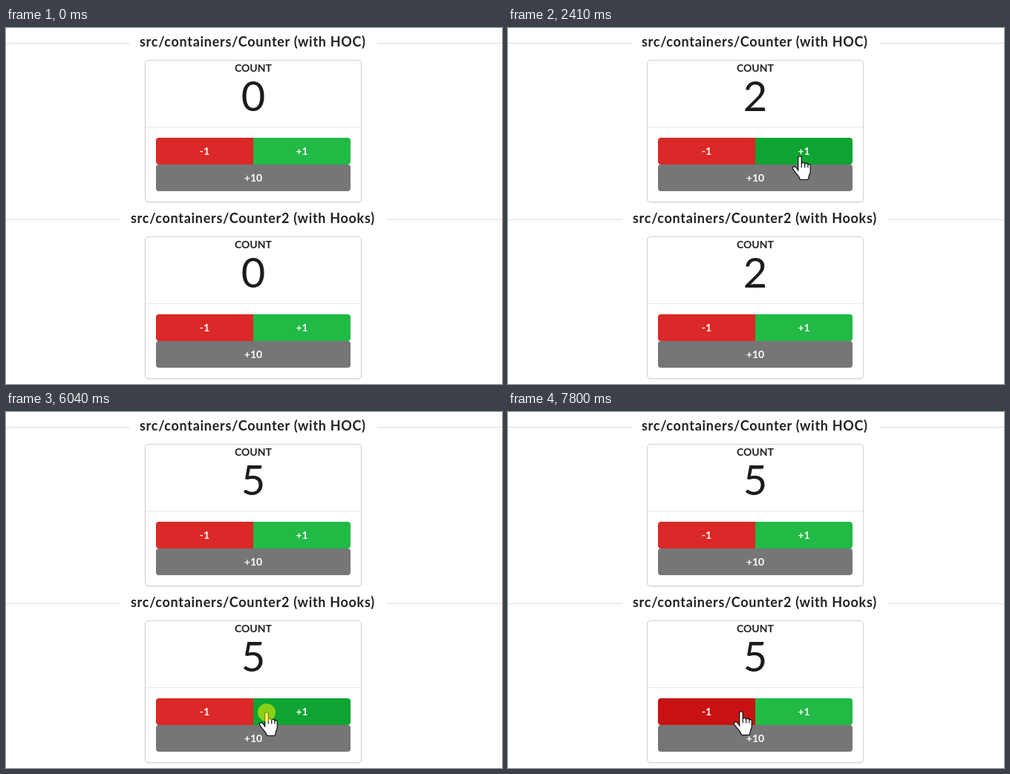
These frames come from a looping animation (668x480 px, 8000 ms). An HTML page:

```html
<!DOCTYPE html>
<html lang="en">
<head>
<meta charset="utf-8">
<title>Counters</title>
<style>
  html, body { margin: 0; width: 100%; height: 100%; overflow: hidden; background: #fff; }
  svg { display: block; width: 668px; height: 480px; font-family: Lato, sans-serif; }
  .title { font-size: 18px; font-weight: 700; letter-spacing: .7px; fill: #212121; }
  .mid { text-anchor: middle; }
  .label { font-size: 14px; font-weight: 700; fill: #212121; }
  .value { font-size: 56px; fill: #1b1c1d; }
  .btn { font-size: 14px; font-weight: 700; fill: #fff; }
  .card { fill: #fff; filter: drop-shadow(0 1px 1.5px #d4d4d5); }
  .edge { fill: none; stroke: #d4d4d5; }
  .cursor { fill: #fff; stroke: #000; stroke-linejoin: round; }
</style>
</head>
<body>
<svg viewBox="0 0 668 480">
  <g id="panels"></g>
  <path id="arrow" class="cursor" d="M.5.5V25.5L6.3 20.2 10.4 29.5 14.4 27.8 10.4 18.5H18.3Z"/>
  <g id="hand" class="cursor">
    <path transform="translate(-10.5 -1) scale(1.5)" stroke-width=".75"
      d="M5.5 14V2a1.5 1.5 0 0 1 3 0V7.5a1.5 1.5 0 0 1 3 .5a1.4 1.4 0 0 1 2.8 .6a1.1 1.1 0 0 1 2.2 .6V14c0 2.5-1.5 3.5-1.5 5.5Q15 21.7 13 21.7H8.5Q6.5 21.7 6.5 19.5C5 17 2 14.5 .8 12C0 10 2.2 9 3.5 10.6L5.5 13M8.5 7.5V11M11.5 8V11M14.3 8.6V11"/>
  </g>
  <circle id="click" r="12" fill="#ff0" fill-opacity=".5"/>
</svg>
<script>
const LOOP = 8000;
const $ = id => document.getElementById(id);

const GREEN = '#21ba45', HOVER = '#16ab39', FOCUS = '#0ea432', PRESSED = '#149b34';
const RED = '#db2828';

// One panel: divider title, card, count and three buttons
const panel = (n, y, title, x, left, right) => `
  <g transform="translate(0 ${y})">
    <path d="M0 20.5H${left}M${right} 20.5H668" stroke="#dedede"/>
    <text class="title" x="${x}" y="25">${title}</text>
    <rect class="card" x="188" y="44" width="290" height="190" rx="4"/>
    <rect class="edge" x="187.5" y="43.5" width="291" height="191" rx="4.5"/>
    <path d="M188 133.5H478" stroke="#000" stroke-opacity=".09"/>
    <text class="mid label" x="333" y="59">COUNT</text>
    <text class="mid value" x="333" y="112" id="count${n}">0</text>
    <path id="minus${n}" d="M333 148H206a4 4 0 0 0-4 4V180a4 4 0 0 0 4 4H333Z" fill="${RED}"/>
    <path id="plus${n}" d="M333 148H460a4 4 0 0 1 4 4V180a4 4 0 0 1-4 4H333Z" fill="${GREEN}"/>
    <rect x="202" y="184" width="262" height="36" rx="4" fill="#767676"/>
    <text class="mid btn" x="267.5" y="171">-1</text>
    <text class="mid btn" x="398.5" y="171">+1</text>
    <text class="mid btn" x="333" y="207">+10</text>
  </g>`;

$('panels').innerHTML =
  panel(1, 0, 'src/containers/Counter (with HOC)', 180, 166, 500) +
  panel(2, 238, 'src/containers/Counter2 (with Hooks)', 168, 154, 512);

// Each track lists [start time, value...]; a value holds until the next entry
const counts = [[0, 0], [1640, 1], [2410, 2], [3180, 3], [4830, 4], [5490, 5], [6140, 6], [7800, 5]];
const clicks = [[0, 0], [2290, 1], [2410, 0], [3060, 1], [3180, 0], [4720, 1], [4830, 0],
  [5370, 1], [5490, 0], [6040, 1], [6140, 0], [7680, 1], [7800, 0]];
const fills = {
  plus1: [[0, GREEN], [1320, '#1db340'], [1430, HOVER], [1640, FOCUS], [4720, GREEN]],
  plus2: [[0, GREEN], [4060, '#1db340'], [4170, HOVER], [4720, FOCUS], [4830, PRESSED],
    [6040, FOCUS], [7680, GREEN]],
  minus2: [[0, RED], [7350, '#d82424'], [7470, '#d01919'], [7680, '#c81111']]
};
const moves = [
  [0, 700, 500, 'arrow'], [100, 568, 466, 'arrow'], [210, 561, 440, 'arrow'],
  [320, 548, 408, 'arrow'], [430, 532, 374, 'arrow'], [540, 514, 342, 'arrow'],
  [650, 497, 314, 'arrow'], [760, 480, 291, 'arrow'], [870, 464, 271, 'arrow'],
  [990, 446, 248, 'arrow'], [1100, 428, 224, 'arrow'], [1210, 411, 200, 'hand'],
  [1320, 398, 180, 'hand'], [1430, 393, 173, 'hand'],
  [3390, 390, 182, 'hand'], [3500, 385, 207, 'hand'], [3610, 377, 245, 'arrow'],
  [3730, 368, 282, 'arrow'], [3850, 362, 325, 'arrow'], [3960, 356, 365, 'arrow'],
  [4060, 352, 392, 'hand'], [4170, 350, 405, 'hand'], [4390, 351, 405, 'hand'],
  [7240, 345, 405, 'hand'], [7350, 326, 404, 'hand'], [7470, 314, 404, 'hand']
];

const at = (track, t) => track.findLast(step => step[0] <= t);

function draw(t) {
  const count = at(counts, t)[1];
  $('count1').textContent = $('count2').textContent = count;
  for (const id in fills) $(id).setAttribute('fill', at(fills[id], t)[1]);

  const [, x, y, shape] = at(moves, t);
  for (const id of ['arrow', 'hand', 'click']) $(id).setAttribute('transform', `translate(${x} ${y})`);
  $('arrow').style.display = shape === 'arrow' ? '' : 'none';
  $('hand').style.display = shape === 'hand' ? '' : 'none';
  $('click').style.display = at(clicks, t)[1] ? '' : 'none';
}

function tick() {
  draw(performance.now() % LOOP);
  requestAnimationFrame(tick);
}
tick();
</script>
</body>
</html>
```
